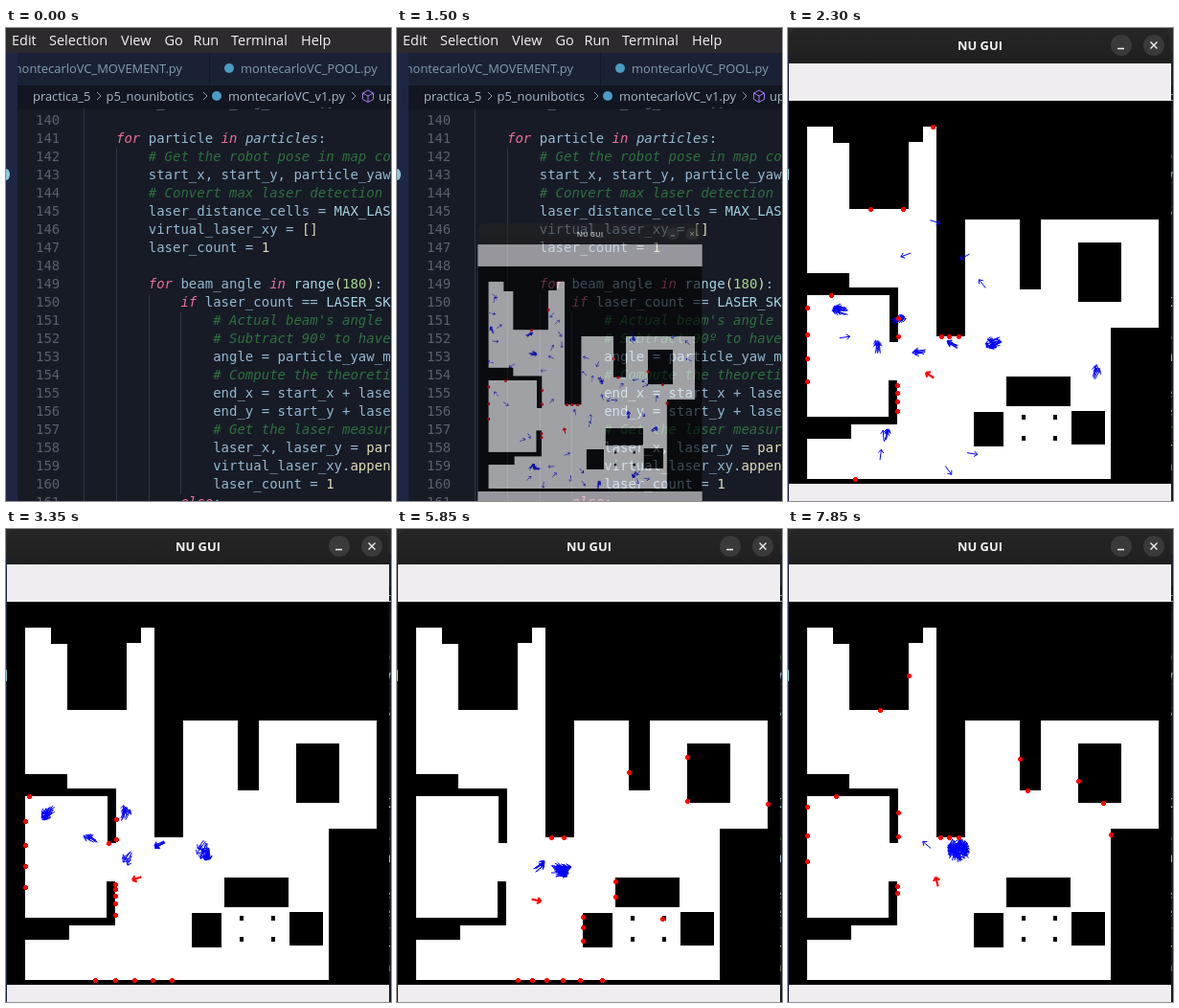
An HTML page with a canvas for the animation above (8000 ms loop, 402 px wide and 494 px high).

```html
<!DOCTYPE html>
<html lang="en">
<head>
<meta charset="utf-8">
<title>Particle localisation</title>
<style>
html, body { margin: 0; width: 100%; height: 100%; overflow: hidden; background: #171b26; }
#stage { position: relative; width: 402px; height: 494px; overflow: hidden; }
#stage *, #win { position: absolute; }
#stage pre span { position: static; }
#stage svg { left: 0; top: 0; }
.ui { font-family: "Open Sans", "Noto Sans", sans-serif; font-size: 12.9px; fill: #a9b9c9; }
.menu { font-size: 14.5px; fill: #f2f2f2; }
.tab { fill: #839cb2; }
pre { margin: 0; top: 68px; font: 14px/19px "DejaVu Sans Mono", monospace; color: #94b8d0; white-space: pre; }
#nums { left: 31px; color: #5a606c; }
#code { left: 115px; }
.k { color: #ee6f95; font-style: italic; }
.c { color: #2f7040; font-style: italic; }
.i { font-style: italic; }
.f { color: #a3d3e0; }
.g { color: #a9d48e; }
.n { color: #dfdcb4; }
#win { left: 0; top: 0; width: 402px; height: 494px; transform-origin: 203px 495px; }
#bar { left: 1px; top: 0; width: 399px; height: 37px; background: linear-gradient(#272627, #1f1f1f); border-radius: 11px 11px 0 0; }
#body { left: 1px; top: 37px; width: 399px; height: 457px; background: #efedef; }
</style>
</head>
<body>
<div id="stage">
  <pre id="nums"></pre>
  <pre id="code">laser_distance_ang_max = <span class="n">[]</span>

<span class="k">for</span> particle <span class="k">in</span> <span class="i">particles</span>:
    <span class="c"># Get the robot pose in map coordinates</span>
    start_x, start_y, particle_yaw_map
    <span class="c"># Convert max laser detection</span>
    laser_distance_cells = <span class="f">MAX_LASER</span>
    virtual_laser_xy = <span class="n">[]</span>
    laser_count = <span class="n">1</span>

    <span class="k">for</span> beam_angle <span class="k">in</span> <span class="f">range</span><span class="n">(</span><span class="g">180</span><span class="n">)</span>:
        <span class="k">if</span> laser_count == <span class="f">LASER_SKIP</span>:
            <span class="c"># Actual beam's angle</span>
            <span class="c"># Subtract 90º to have</span>
            angle = particle_yaw_map
            <span class="c"># Compute the theoretical</span>
            end_x = start_x + laser
            end_y = start_y + laser
            <span class="c"># Get the laser measure</span>
            laser_x, laser_y = <span class="n">particle</span>
            virtual_laser_xy.<span class="n">append</span>
            laser_count = <span class="n">1</span>
        <span class="k">else</span>:</pre>
  <svg width="402" height="494">
    <defs>
      <linearGradient id="shade" x2="0" y2="1">
        <stop stop-color="#10141d"/><stop offset="1" stop-color="#10141d" stop-opacity="0"/>
      </linearGradient>
    </defs>
    <path d="M81.500 82V494M115.500 126V494M149.500 278V494M182.500 297V487" stroke="#303645" fill="none"/>
    <rect y="26" width="402" height="34" fill="#1b2135"/>
    <path d="M212.500 26V60" stroke="#12172a"/>
    <rect y="60" width="402" height="22" fill="#111620"/>
    <rect y="82" width="402" height="5" fill="url(#shade)"/>
    <g class="ui">
      <text class="tab" x="184" y="47" text-anchor="end">montecarloVC_MOVEMENT.py</text>
      <text class="tab" x="245" y="47">montecarloVC_POOL.py</text>
      <text x="28" y="76">practica_5</text>
      <text x="104.500" y="76">p5_nounibotics</text>
      <text x="232" y="76">montecarloVC_v1.py</text>
      <text x="389" y="76">up</text>
    </g>
    <path d="M95 67l4 4-4 4M206 67l4 4-4 4M361 67l4 4-4 4" stroke="#8b9bad" fill="none"/>
    <g fill="#4a9dc2"><circle cx="233" cy="42" r="5"/><circle cx="220" cy="71" r="5"/></g>
    <path d="M378 65l5.500 3v6.500l-5.500 3-5.500-3V68zM372.500 68l5.500 3 5.500-3M378 71v6.500" stroke="#a77bf0" fill="none"/>
    <rect y="26" width="12" height="468" fill="#1e2644"/>
    <ellipse cy="153" rx="4" ry="6" fill="#8cc8dc"/>
    <rect width="402" height="26" fill="#2c2a2c"/>
    <g class="ui" id="menu"></g>
  </svg>
  <div id="win">
    <div id="bar"></div>
    <div id="body"></div>
    <canvas id="map" width="402" height="494"></canvas>
    <svg width="402" height="494">
      <text class="ui" x="200.500" y="23.500" text-anchor="middle" font-weight="700" style="fill:#f3f3f3">NU GUI</text>
      <g fill="#3b3a3b"><circle cx="348" cy="18" r="11"/><circle cx="382" cy="18" r="11"/></g>
      <path d="M344 21.500h7M378.500 14.500l7 7M385.500 14.500l-7 7" stroke="#f0f0f0" stroke-width="1.400" fill="none"/>
    </svg>
  </div>
</div>
<script>
const LOOP = 8000, OPEN = 1500, RAD = Math.PI / 180;
const $ = id => document.getElementById(id);
const win = $('win'), ctx = $('map').getContext('2d');

$('nums').textContent = Array.from({ length: 23 }, (_, i) => 139 + i).join('\n');
const menu = { Edit: 6, Selection: 45, View: 120, Go: 165.5, Run: 195.5, Terminal: 235, Help: 308 };
$('menu').innerHTML = Object.entries(menu)
  .map(([name, x]) => `<text class="menu" x="${x}" y="18">${name}</text>`).join('');

const rect = (x, y, w, h) => `M${x} ${y}h${w}v${h}h${-w}z`;
const legs = [244, 277].flatMap(x => [404, 426].map(y => rect(x, y, 4, 5))).join('');
const floor = new Path2D(
  'M20 103H47V120H64V189H126V119H141V103H155V322H185V200H242V273H264V200H387V313H337V471' +
  'H20V429H66V414H114V368H105V406H20V279H106V328H115V271H64V256H20Z' +
  rect(303, 224, 45, 62) + rect(228, 364, 67, 31) + rect(194, 401, 31, 36) + rect(296, 400, 35, 35) + legs);
const isFree = (x, y) => ctx.isPointInPath(floor, x, y, 'evenodd');

function random(seed) {
  return () => (seed = (seed * 16807) % 2147483647) / 2147483647;
}

const dir = (a, r) => [r * Math.cos(a * RAD), -r * Math.sin(a * RAD)];
// The robot, and every particle in its own frame, drives in a circle
const orbit = h => dir(h - 95, 12.2);

// Robot heading in degrees, nearly steady
const turns = [[1450, 103], [2250, 146], [4450, 265], [7850, 463]];
function heading(t) {
  const i = Math.max(1, turns.findIndex(k => k[0] >= t));
  const [t0, h0] = turns[i - 1], [t1, h1] = turns[i];
  return h0 + (h1 - h0) * (t - t0) / (t1 - t0);
}

// Initial guesses all over the free floor, some in small bundles
const guesses = [];
for (const rnd = random(2024); guesses.length < 62;) {
  const x = 20 + rnd() * 367, y = 103 + rnd() * 368, h = rnd() * 360;
  if (isFree(x, y)) guesses.push({ x, y, h, n: guesses.length % 6 ? 1 : 5 });
}

// Groups that survive resampling; x, y and h hold at time key
const group = (x, y, h, n) => ({ x, y, h, n });
const stages = [
  { from: 2050, key: 2250, groups: [
    group(55, 295, 175, 14), group(115, 305, 20, 8), group(94, 333, 90, 6),
    group(137, 338, 180, 5), group(172, 331, 150, 6), group(215, 329, 200, 18)] },
  { from: 3450, key: 4450, groups: [group(132, 357, 305, 45), group(157, 348, 265, 20)] },
  { from: 5050, key: 5850, groups: [group(149, 353, 40, 8), group(171, 356, 346, 34)] },
  { from: 6650, key: 7850, groups: [group(145, 330, 140, 1), group(178, 335, 110, 70)] }
];

function arrow(x, y, a, len, head, spread) {
  const [dx, dy] = dir(a, len), tx = x + dx, ty = y + dy;
  ctx.beginPath();
  ctx.moveTo(x, y);
  ctx.lineTo(tx, ty);
  for (const s of [-spread, spread]) {
    const [hx, hy] = dir(a + 180 + s, head);
    ctx.moveTo(tx, ty);
    ctx.lineTo(tx + hx, ty + hy);
  }
  ctx.stroke();
}

function drawGroup({ x, y, h, n }, turn) {
  const rnd = random(Math.round(x * 97 + y * 31));
  const radius = n > 1 ? Math.sqrt(n) : 0, fan = n > 1 ? 12 + n * 0.6 : 0;
  for (let i = 0; i < n; i++) {
    const [ox, oy] = dir(rnd() * 360, radius * Math.sqrt(rnd()));
    const a = h + (rnd() * 2 - 1) * fan, b = a + turn;
    const [x0, y0] = orbit(a), [x1, y1] = orbit(b), [hx, hy] = dir(b, 5.5);
    arrow(x + ox + x1 - x0 - hx, y + oy + y1 - y0 - hy, b, 11, 4.5, 38);
  }
}

function drawParticles(t) {
  const turnFrom = key => heading(t) - heading(key);
  ctx.strokeStyle = '#00f';
  ctx.lineWidth = 1;
  const left = t < 2050 ? guesses.length : Math.max(0, Math.round((2950 - t) / 70));
  guesses.slice(guesses.length - left).forEach(g => drawGroup(g, turnFrom(1450)));
  const stage = stages.filter(s => s.from <= t).pop();
  if (stage) stage.groups.forEach(g => drawGroup(g, turnFrom(stage.key)));
}

function drawRobot(h) {
  const [ox, oy] = orbit(h), x = 144.5 + ox, y = 375 + oy;
  ctx.fillStyle = ctx.strokeStyle = '#f00';
  for (let i = 0; i < 18; i++) {
    const [dx, dy] = dir(h + (i - 8.5) * 10.15, 0.5);
    let px = x, py = y;
    while (isFree(px, py)) { px += dx; py += dy; }
    px = Math.round(px);
    py = Math.round(py);
    ctx.fillRect(px - 2, py - 1, 5, 3);
    ctx.fillRect(px - 1, py - 2, 3, 5);
  }
  ctx.lineWidth = 2.2;
  arrow(x, y, h, 10, 5, 40);
}

let shown = -1;
function drawMap(t) {
  if (t === shown) return;
  shown = t;
  ctx.fillStyle = '#000';
  ctx.fillRect(1, 76, 399, 400);
  ctx.fillStyle = '#fff';
  ctx.fill(floor, 'evenodd');
  drawParticles(t);
  drawRobot(heading(t));
}

function frame() {
  const t = Math.floor(performance.now() % LOOP / 50) * 50;
  const open = t >= OPEN;
  win.style.visibility = open ? 'visible' : 'hidden';
  if (open) {
    const p = Math.min(1, (t - OPEN + 30) / 235);
    const grow = p === 1 ? 1 : 1 - 2 ** (-10 * p);
    win.style.transform = `scale(${grow})`;
    win.style.opacity = grow;
    drawMap(Math.floor((t - 50) / 200) * 200 + 50); // the view refreshes five times a second
  }
  requestAnimationFrame(frame);
}
frame();
</script>
</body>
</html>
```
